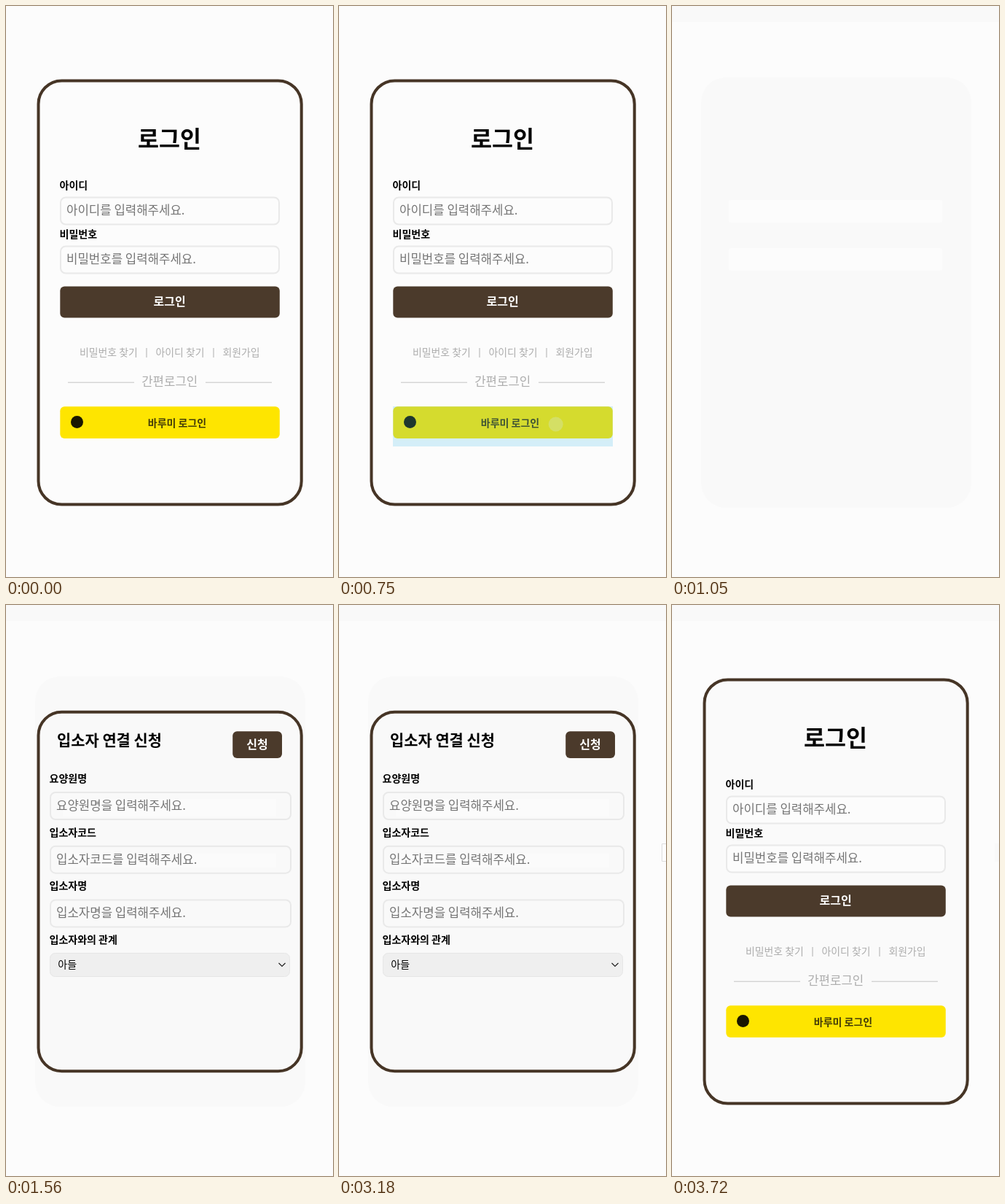
An HTML page with a canvas for the animation above (3.78 s loop, 449 px wide and 783 px high).

```html
<!DOCTYPE html>
<html lang="ko">
<head>
<meta charset="utf-8">
<title>로그인</title>
<style>
html, body { margin: 0; width: 100%; height: 100%; overflow: hidden; background: #fcfcfc; }
canvas { display: block; width: 449px; height: 783px; }
</style>
</head>
<body>
<canvas id="stage"></canvas>
<script>
const W = 449, H = 783, LOOP = 3780;
const FONT = '"Noto Sans CJK KR", "Noto Sans KR", "Noto Sans CJK", sans-serif';
const BROWN = '#4b3a2b', EDGE = '#463526', PAGE = '#fcfcfc', TINT = '#f9f9f9';
const HINT = '#757575', PALE = '#adadad';

const canvas = document.getElementById('stage');
const ctx = canvas.getContext('2d');
const dpr = window.devicePixelRatio || 1;
canvas.width = W * dpr;
canvas.height = H * dpr;
ctx.scale(dpr, dpr);

function rect(x, y, w, h, color) {
  ctx.fillStyle = color;
  ctx.fillRect(x, y, w, h);
}

function round(x, y, w, h, r, fill, stroke, line) {
  ctx.beginPath();
  ctx.roundRect(x, y, w, h, r);
  if (fill) { ctx.fillStyle = fill; ctx.fill(); }
  if (stroke) { ctx.strokeStyle = stroke; ctx.lineWidth = line; ctx.stroke(); }
}

function disc(x, y, r, fill) {
  ctx.beginPath();
  ctx.arc(x, y, r, 0, Math.PI * 2);
  ctx.fillStyle = fill;
  ctx.fill();
}

// y is the middle of the Hangul syllables
function text(str, x, y, size, color, weight = 400, align = 'left') {
  ctx.font = `${weight} ${size}px ${FONT}`;
  ctx.textAlign = align;
  ctx.fillStyle = color;
  ctx.fillText(str, x, y + size * 0.355);
}

const card = (y, h, fill) => round(44.5, y + 2, 361.2, h - 4, 32, fill, EDGE, 4);

function field(x, y, w, h, gap, label, hint, fill) {
  text(label, x - 0.5, y - gap, 14, '#000', 700);
  round(x + 1, y + 1, w - 2, h - 2, 7, fill, '#e9e9e9', 2);
  text(hint, x + 9, y + h / 2 - 0.5, 16.75, HINT);
}

function page(header) {
  rect(0, 0, W, H, PAGE);
  if (header) rect(0, 0, W, 22, TINT);
}

function login(fill) {
  card(100.4, 585.2, fill);
  text('로그인', 224.5, 182.5, 31.5, '#000', 700, 'center');
  field(74, 261.5, 302, 39, 15, '아이디', '아이디를 입력해주세요.', PAGE);
  field(74, 328.5, 302, 39, 15, '비밀번호', '비밀번호를 입력해주세요.', PAGE);
  round(74.3, 384.5, 301.5, 43, 6, BROWN);
  text('로그인', 224.7, 405.5, 16, '#fff', 700, 'center');

  text('비밀번호 찾기', 101, 475, 13.9, PALE);
  text('아이디 찾기', 205.5, 475, 13.9, PALE);
  text('회원가입', 297.5, 475, 13.9, PALE);
  rect(192.5, 469, 1, 13, PALE);
  rect(284.5, 469, 1, 13, PALE);

  rect(85, 515.7, 91, 1, '#c4c4c4');
  rect(274, 515.7, 91, 1, '#c4c4c4');
  text('간편로그인', 224.7, 515.5, 16.75, PALE, 400, 'center');

  round(74.3, 549.2, 301.5, 43.8, 6, '#fee500');
  disc(97.5, 570.5, 8.5, '#191600');
  text('바루미 로그인', 235, 571.7, 14, '#443d08', 600, 'center');
}

function blankCard() {
  round(40, 98, 371, 590, 34, TINT);
}

function form() {
  blankCard();
  card(144.7, 496.6, TINT);
  text('입소자 연결 신청', 70, 186, 20.9, '#000', 700);
  round(311.2, 173.2, 67.8, 36.8, 6, BROWN);
  text('신청', 345, 191, 16, '#fff', 700, 'center');

  rect(78, 266, 293, 24, '#fbfbfb');
  rect(78, 341, 293, 19, '#fbfbfb');
  field(60, 256, 332, 39, 18, '요양원명', '요양원명을 입력해주세요.');
  field(60, 329.7, 332, 39, 18, '입소자코드', '입소자코드를 입력해주세요.');
  field(60, 403.4, 332, 39, 18, '입소자명', '입소자명을 입력해주세요.');

  text('입소자와의 관계', 59.5, 459.2, 14, '#000', 700);
  round(60.5, 477.5, 329, 32, 7, '#efefef', '#e6e6e6', 1);
  text('아들', 71.3, 493, 14, '#000');
  ctx.beginPath();
  ctx.moveTo(374.5, 491);
  ctx.lineTo(379, 495.5);
  ctx.lineTo(383.5, 491);
  ctx.strokeStyle = '#222';
  ctx.lineWidth = 1.2;
  ctx.stroke();
}

// Touch pointer that fades out, followed by the tap highlight
function tap(t) {
  const k = Math.floor((t - 570) / 30);
  if (k < 0 || k > 7) return;
  const x = 299 - k * 0.22, y = 574.5 - k * 0.17;
  disc(x, y, 10, `rgba(247,247,247,${k < 7 ? 0.58 - 0.05 * k : 0.12})`);
  const edge = Math.max(0, 1 - k / 6);
  if (edge) {
    ctx.beginPath();
    ctx.arc(x, y, 9.7, 0, Math.PI * 2);
    ctx.strokeStyle = `rgba(185,190,180,${edge * 0.85})`;
    ctx.lineWidth = 1.3;
    ctx.stroke();
  }
  if (k >= 5) rect(74, 549, 302, 55, 'rgba(51,181,229,0.2)');
}

// Small box peeking in at the right edge
function edgeBox(t) {
  if (t < 3180) return;
  rect(443, 327, 6, 25, TINT);
  const a = t < 3240 ? 1 : Math.max(0, 1 - (Math.floor((t - 3240) / 30) + 1) / 5);
  if (!a) return;
  ctx.globalAlpha = a;
  round(443.5, 327.5, 20, 24, 0, '#fefefe', '#dedede', 1);
  ctx.globalAlpha = 1;
}

function draw(t) {
  page(t >= 1050);
  if (t < 1050) {
    login(PAGE);
    tap(t);
  } else if (t < 1560) {
    blankCard();
    round(78, 266, 293, 31, 3, '#fcfcfc');
    round(78, 332, 293, 31, 3, '#fcfcfc');
  } else {
    if (t < 3510) form();
    else login('#fafafa');
    edgeBox(t);
  }
}

const start = performance.now();
function tick() {
  draw((performance.now() - start) % LOOP);
  requestAnimationFrame(tick);
}
tick();
</script>
</body>
</html>
```
